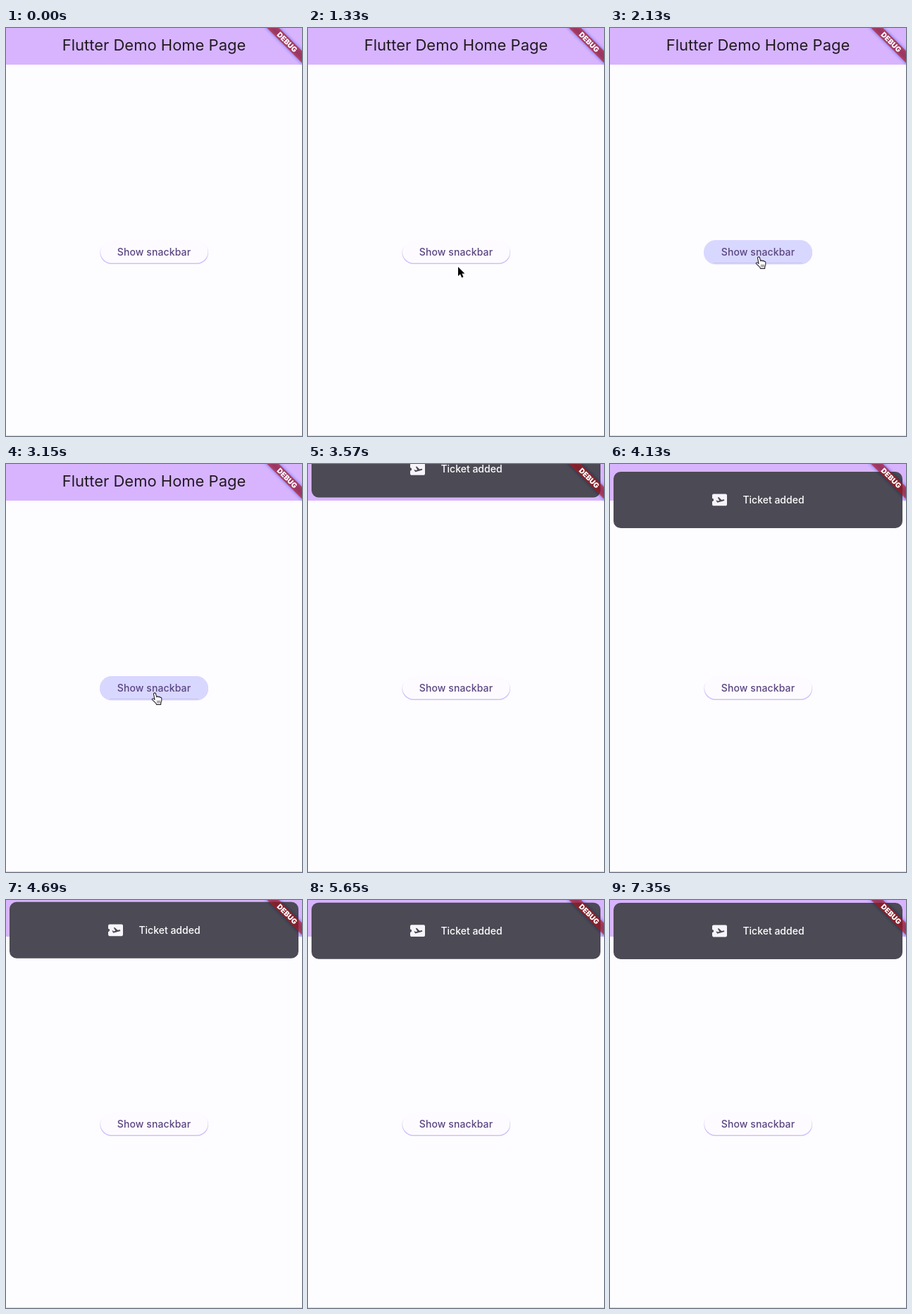
An HTML page that plays this animation: 420x579 px, repeating every 8000 ms.

```html
<!DOCTYPE html>
<html lang="en">
<head>
<meta charset="utf-8">
<title>Snackbar demo</title>
<style>
  html, body { margin: 0; width: 100%; height: 100%; overflow: hidden; background: #fdfcff; }
  svg { display: block; width: 420px; height: 579px; }
  text { font-family: Inter, Roboto, sans-serif; text-anchor: middle; }
  .label { font-size: 14px; font-weight: 500; }
  .shade { mix-blend-mode: multiply; }
</style>
</head>
<body>
<svg viewBox="0 0 420 579">
  <defs>
    <filter id="blur" x="-30%" y="-120%" width="160%" height="340%">
      <feGaussianBlur stdDeviation="2.8"/>
    </filter>
  </defs>

  <rect width="420" height="579" fill="#fdfcff"/>
  <rect width="420" height="52" fill="#d8b4ff"/>
  <text x="210" y="32" font-size="22" fill="#1f1b24">Flutter Demo Home Page</text>
  <rect y="578" width="420" height="1" fill="#e0dfb2"/>

  <rect x="133.5" y="303" width="153.5" height="32" rx="16" fill="#cfc2fb"/>
  <rect x="134" y="301.5" width="152.5" height="32" rx="16" fill="#fdfbff"/>
  <g id="hover">
    <rect x="133" y="301" width="154" height="34.5" rx="17" fill="#d8d7ff"/>
    <path d="M147 333.5H273" stroke="#c5c2f2"/>
  </g>
  <text class="label" x="210" y="322.5" letter-spacing=".1" fill="#5a4580">Show snackbar</text>

  <g id="bar">
    <rect x="5" y="4" width="410" height="80" rx="10" fill="#4b4a55"/>
    <path transform="translate(142.9 31.4) scale(1.05)" fill="#f7f4fa" d="M20.19 4H4c-1.1 0-1.99.9-1.99 2v4c1.1 0 1.99.9 1.99 2s-.89 2-2 2v4c0 1.1.9 2 2 2h16.19c1 0 1.81-.9 1.81-2V6c0-1.1-.81-2-1.81-2zM17.73 13.3l-8.86 2.36-1.66-2.88.93-.25 1.26.99 2.39-.64-2.4-4.16 1.4-.38 4.01 3.74 2.44-.65c.51-.14 1.04.17 1.18.68.14.51-.17 1.04-.69 1.19z"/>
    <text class="label" x="232" y="49" fill="#fff">Ticket added</text>
  </g>

  <g class="shade" transform="translate(423 -4) rotate(45)">
    <rect x="-40" y="28" width="80" height="12" fill="#8090dc" filter="url(#blur)"/>
  </g>
  <g transform="translate(423 -4) rotate(45)">
    <rect x="-40" y="28" width="80" height="12" fill="#b71c1c" fill-opacity=".63"/>
    <text y="37.7" font-size="10.2" font-weight="900" fill="#fff">DEBUG</text>
  </g>

  <g id="arrow" stroke-linejoin="round">
    <path d="M0 0V13L3 10.2 5.2 15.3 7.5 14.3 5.4 9.4H9.4Z" fill="#000" stroke="#fff" stroke-width="1.6" paint-order="stroke"/>
  </g>
  <g id="hand" stroke-linejoin="round" stroke-linecap="round">
    <path d="M-1.6 1.2C-1.4-.4 .9-.6 1.4 1L2.8 5.6C3.4 4.6 5 4.7 5.4 5.8 6.2 5 7.5 5.3 7.8 6.4 8.8 5.9 9.7 6.6 9.8 7.7 10.1 10.4 9.8 12.4 8.8 14.2L8.6 16.4H2.4L1.8 14.6C.2 13.2-1.6 11.2-3.4 9.6-4.4 8.4-2.8 7.2-1.6 8.1L0 9.4Z" fill="#fff" stroke="#2b2430" stroke-width="1.1"/>
    <path d="M3.7 11V14M5.6 11V14M7.4 11V14" stroke="#2b2430" stroke-width=".7"/>
  </g>
</svg>
<script>
  const LOOP = 8000;
  const $ = id => document.getElementById(id);
  const clamp = v => Math.min(1, Math.max(0, v));
  const show = (el, on) => el.setAttribute('visibility', on ? 'visible' : 'hidden');
  const move = (el, x, y) => el.setAttribute('transform', `translate(${x} ${y})`);

  // Pointer keys: step, x, y
  const path = [[8, 419, 452], [17, 222, 358], [29, 213, 339], [36, 212, 330], [40, 211, 325], [71, 211, 325]];
  const ENTER = 8, HOVER = 36, LEAVE = 71;
  const SLIDE_START = 73.7, SLIDE_STEPS = 57.4, SLIDE = 88;

  // Six steps per 280 ms; the sixth is held for 100 ms.
  function stepAt(ms) {
    const t = Math.max(0, ms - 30);
    return 6 * Math.floor(t / 280) + Math.min(5, Math.floor((t % 280) / 36));
  }

  function pointerAt(n) {
    const i = Math.max(1, path.findIndex(k => k[0] >= n));
    const [a, ax, ay] = path[i - 1], [b, bx, by] = path[i];
    const p = clamp((n - a) / (b - a));
    const e = 1 - (1 - p) ** 2;
    return [ax + (bx - ax) * e, ay + (by - ay) * e];
  }

  function slideAt(n) {
    const t = clamp((n - SLIDE_START) / SLIDE_STEPS);
    return t === 1 ? 0 : -SLIDE * 2 ** (-10 * t) * Math.cos(t * Math.PI * 5);
  }

  function draw(ms) {
    const n = stepAt(ms);
    const [x, y] = pointerAt(n);
    move($('arrow'), x, y);
    move($('hand'), x, y);
    show($('arrow'), n >= ENTER && n < HOVER);
    show($('hand'), n >= HOVER && n < LEAVE);
    $('hover').setAttribute('opacity', clamp((n - HOVER) / 4) * clamp((LEAVE + 4 - n) / 4));
    show($('bar'), n >= SLIDE_START);
    move($('bar'), 0, slideAt(n));
  }

  const start = performance.now();
  function tick() {
    draw((performance.now() - start) % LOOP);
    requestAnimationFrame(tick);
  }
  tick();
</script>
</body>
</html>
```
